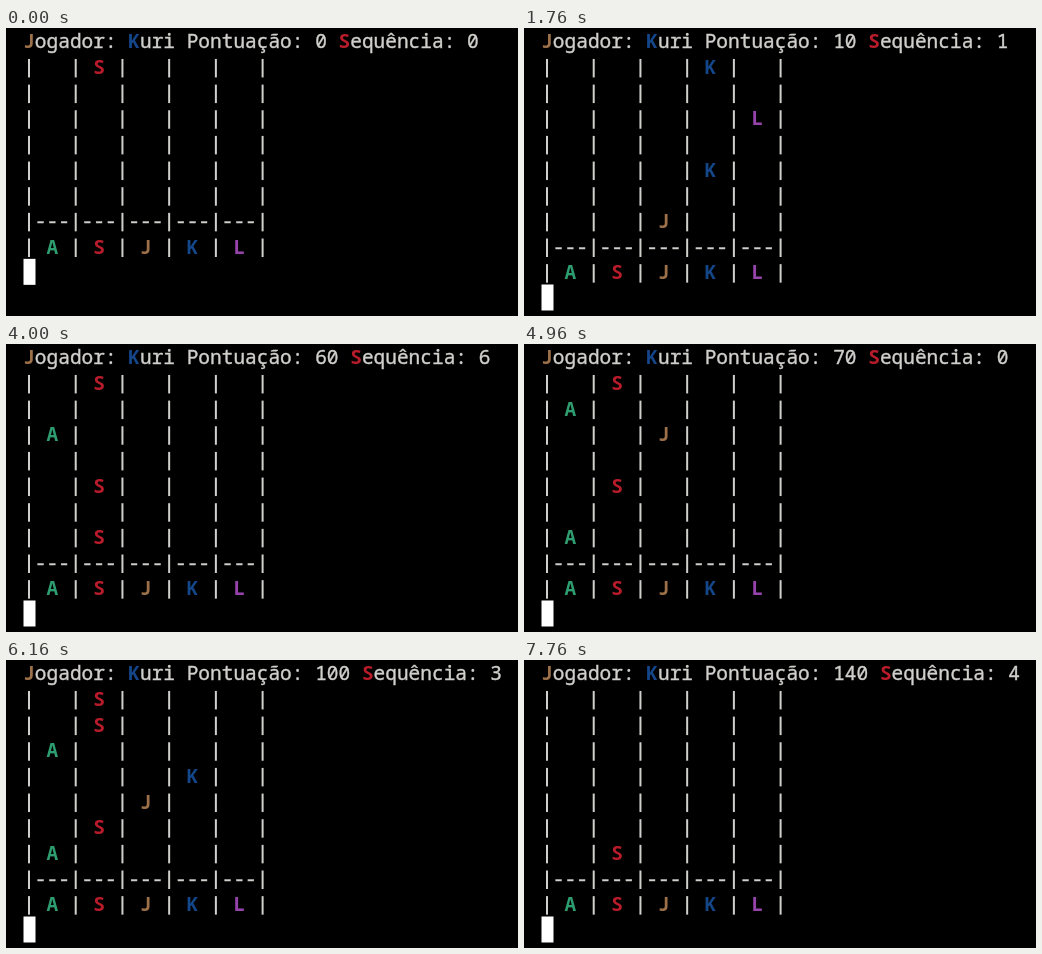
An HTML page with a canvas that plays this animation: 512 px wide and 288 px high, repeating every 7.84 s.

```html
<!DOCTYPE html>
<html lang="pt">
<head>
<meta charset="utf-8">
<title>Jogo de notas</title>
<style>
html, body { margin: 0; width: 100%; height: 100%; overflow: hidden; background: #000; }
canvas { display: block; width: 512px; height: 288px; filter: blur(0.45px); }
</style>
</head>
<body>
<canvas id="stage" width="512" height="288"></canvas>
<script>
const ctx = document.getElementById('stage').getContext('2d', { alpha: false });

const LOOP = 7840, STEP = 80;
const TICK = 242, TICK_START = 30;
const CELL = 11.68, LINE = 25.65, LEFT = 23, BASE = 20.3;
const FONT = '19.47px "Noto Sans Mono", "DejaVu Sans Mono", monospace';
const TEXT = '#d0cfcc';
const LANES = 'ASJKL';
const COLORS = { A: '#2e9e70', S: '#b81c2a', J: '#9c7048', K: '#14468a', L: '#9644ac' };
const FALL = 7;

// Lane letter and the tick at which the note enters the top row
const notes = [
  ['S', -1], ['J', 1], ['K', 3], ['L', 5], ['K', 7], ['J', 9], ['S', 10],
  ['S', 12, 'miss'], ['A', 14], ['S', 16], ['J', 18], ['A', 19, 'miss'],
  ['S', 20, 'miss'], ['J', 21], ['K', 22], ['A', 23], ['S', 24], ['S', 25]
];

function print(text, row, col = 0) {
  const y = BASE + row * LINE;
  [...text].forEach((ch, i) => {
    if (ch === ' ') return;
    const x = LEFT + (col + i) * CELL;
    const color = COLORS[ch];
    ctx.fillStyle = ctx.strokeStyle = color || TEXT;
    if (ch === '|') {
      ctx.fillRect(x - 1, y - 15, 2, 18.5);
      return;
    }
    ctx.font = (color ? 'bold ' : '') + FONT;
    ctx.fillText(ch, x, y);
    if (!color) ctx.strokeText(ch, x, y);
  });
}

function tally(tick) {
  let score = 0, streak = 0;
  for (const [, born, miss] of notes) {
    if (tick < born + FALL) break;
    if (miss) {
      streak = 0;
    } else {
      score += 10;
      streak++;
    }
  }
  return { score, streak };
}

function draw(time) {
  const t = Math.floor(time / STEP) * STEP;
  const tick = Math.floor((t - TICK_START) / TICK);
  const rows = t < 560 ? 6 : 7;
  const { score, streak } = tally(tick);

  ctx.fillStyle = '#000';
  ctx.fillRect(0, 0, 512, 288);
  ctx.textAlign = 'center';
  ctx.textBaseline = 'alphabetic';
  ctx.lineWidth = 0.4;

  print(`Jogador: Kuri Pontuação: ${score} Sequência: ${streak}`, 0);
  for (let r = 1; r <= rows; r++) print('|   '.repeat(5) + '|', r);
  print('|---'.repeat(5) + '|', rows + 1);
  print([...LANES].map(ch => `| ${ch} `).join('') + '|', rows + 2);

  for (const [lane, born] of notes) {
    const row = tick - born + 1;
    if (row >= 1 && row <= rows) print(lane, row, LANES.indexOf(lane) * 4 + 2);
  }

  // The cursor blinks off once before the board grows
  if (t < 320 || t >= 560) {
    ctx.fillStyle = '#fff';
    ctx.fillRect(17.5, (rows + 3) * LINE, 12, 26);
  }
}

const start = performance.now();
function frame() {
  draw((performance.now() - start) % LOOP);
  requestAnimationFrame(frame);
}
frame();
</script>
</body>
</html>
```
